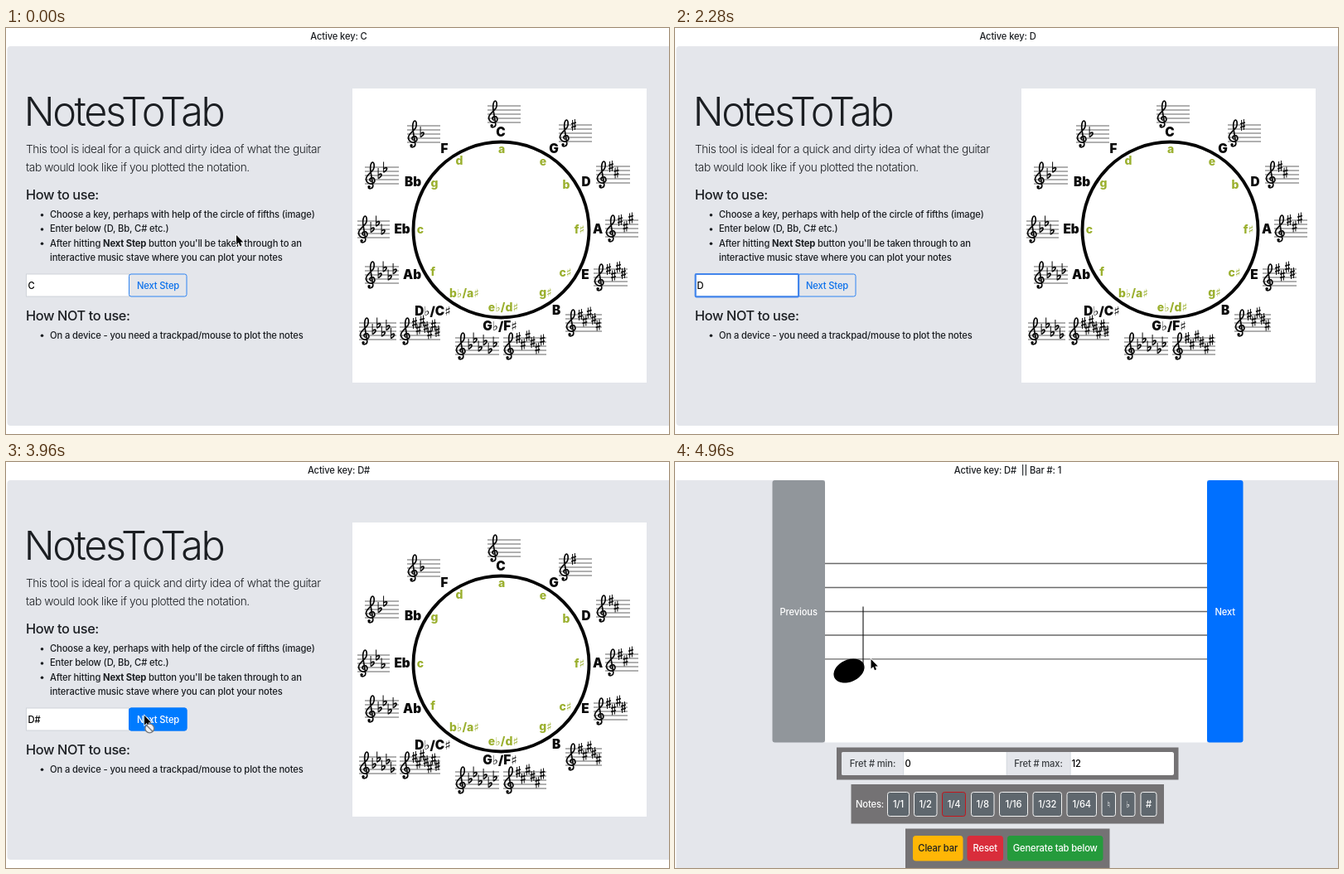
An HTML page that plays this animation: 800 px wide and 490 px high, repeating every 5000 ms.

```html
<!DOCTYPE html>
<html lang="en">
<head>
<meta charset="utf-8">
<title>NotesToTab</title>
<style>
  html, body { margin: 0; width: 100%; height: 100%; overflow: hidden; background: #fff; }
  svg { display: block; width: 800px; height: 490px; }
  text {
    font: 450 11.2px Inter, "DejaVu Sans", sans-serif;
    font-optical-sizing: none;
    letter-spacing: -.012em;
    fill: #1b1e22;
    white-space: pre;
  }
  .mid { text-anchor: middle; }
  .title { font-size: 48.5px; font-weight: 340; letter-spacing: -.049em; }
  .lead { font-size: 13.7px; font-weight: 350; letter-spacing: -.027em; }
  .head { font-size: 16.3px; font-weight: 550; letter-spacing: -.024em; }
  .bold { font-weight: 700; }
  .field { fill: #000; }
  .white { fill: #fff; }
  .key { font-size: 15.3px; font-weight: 900; letter-spacing: 0; fill: #0b0b0b; }
  .minor { font-size: 14px; font-weight: 800; letter-spacing: 0; fill: #9bb02f; }
  .note { font-weight: 550; }
</style>
</head>
<body>
<svg viewBox="0 0 800 490">
  <rect width="800" height="490" fill="#fff"/>
  <text id="header" class="mid" x="401.5" y="14.2"></text>

  <g id="intro">
    <rect x="1.5" y="22" width="806" height="458" rx="4" fill="#e4e6eb"/>
    <text class="title" x="21.8" y="118">NotesToTab</text>
    <text class="lead" x="24" y="151">This tool is ideal for a quick and dirty idea of what the guitar</text>
    <text class="lead" x="24" y="172.7">tab would look like if you plotted the notation.</text>
    <text class="head" x="24" y="207">How to use:</text>
    <text x="53" y="229">Choose a key, perhaps with help of the circle of fifths (image)</text>
    <text x="53" y="246.3">Enter below (D, Bb, C# etc.)</text>
    <text x="53" y="263.6">After hitting <tspan class="bold">Next Step</tspan> button you'll be taken through to an</text>
    <text x="53" y="281">interactive music stave where you can plot your notes</text>
    <text class="head" x="24" y="352.7">How NOT to use:</text>
    <text x="53" y="374.7">On a device - you need a trackpad/mouse to plot the notes</text>
    <g fill="#1b1e22">
      <circle cx="43.5" cy="225.7" r="1.8"/><circle cx="43.5" cy="243" r="1.8"/>
      <circle cx="43.5" cy="260.2" r="1.8"/><circle cx="43.5" cy="371.3" r="1.8"/>
    </g>

    <rect x="24.5" y="297" width="124" height="27" fill="#fff" stroke="#d0d4da"/>
    <rect x="148.5" y="297" width="69.5" height="27" rx="2.5" fill="none" stroke="#2f84f2"/>
    <rect id="hover" x="148.5" y="297" width="69.5" height="27" rx="2.5" fill="#007bff" stroke="#007bff"/>
    <text id="next" class="mid" x="183.5" y="315">Next Step</text>
    <rect id="ring" x="24.7" y="297" width="124.4" height="27.3" rx="1" fill="none" stroke="#4285ec" stroke-width="2.2"/>
    <text id="value" x="26.5" y="315"></text>

    <rect x="418" y="73" width="355" height="355" fill="#fff"/>
    <circle cx="597.5" cy="243.5" r="106" fill="none" stroke="#050505" stroke-width="3.9"/>
    <g id="fifths"></g>
  </g>

  <g id="editor">
    <rect x="1.5" y="22" width="800" height="468" fill="#e4e6eb"/>
    <rect x="181" y="22" width="461" height="316.5" fill="#fff"/>
    <path d="M181 122.5h461M181 151.5h461M181 180.5h461M181 209h461M181 237.8h461" stroke="#6a6a6a" stroke-width="1.3"/>
    <rect x="117.5" y="22" width="63.5" height="316.5" rx="3" fill="#91969b"/>
    <rect x="642" y="22" width="43.5" height="316.5" rx="3" fill="#0070ff"/>
    <text class="mid white" x="149.2" y="184.5">Previous</text>
    <text class="mid white" x="663.7" y="184.5">Next</text>

    <g fill="#747274">
      <rect x="195" y="344.5" width="412.5" height="39"/>
      <rect x="212.5" y="389" width="377.5" height="47.5"/>
      <rect x="278" y="442.5" width="246.5" height="48"/>
    </g>
    <rect x="201" y="350" width="401" height="28" rx="2.5" fill="#fff"/>
    <path d="M203 350H276V378H203Q201 378 201 376V352Q201 350 203 350ZM400 350H477V378H400Z" fill="#e4e6eb"/>
    <path d="M275.7 350V378M400.2 350V378M477.2 350V378" stroke="#cfd4da" stroke-width=".8"/>
    <text class="mid" x="238.5" y="368.2" fill-opacity=".85">Fret # min:</text>
    <text class="mid" x="438.5" y="368.2" fill-opacity=".85">Fret # max:</text>
    <text class="field" x="277.5" y="368.2">0</text>
    <text class="field" x="478.5" y="368.2">12</text>
    <text class="white note" x="218" y="417">Notes:</text>
    <g id="buttons"></g>
    <g id="placed">
      <ellipse cx="210" cy="252" rx="19.5" ry="13.3" transform="rotate(-25 210 252)"/>
      <path d="M227 174.5V249" stroke="#111" stroke-width="1.1"/>
    </g>
  </g>

  <g id="cursor">
    <path id="arrow" d="M0 0V11.6L2.7 9.1L4.5 13.2L6.5 12.3L4.8 8.4H8.3Z" stroke="#fff" stroke-width="1.4" paint-order="stroke"/>
    <g id="banned" fill="none" stroke="#77797c" stroke-width="1.4">
      <circle cx="6.3" cy="15.5" r="5.4" fill="#eceef0"/>
      <path d="M2.6 11.8L10 19.2"/>
    </g>
    <path id="beam" d="M-2.5-5.5Q0-5.5 0-3.5Q0-5.5 2.5-5.5M0-4V4M-2.5 5.5Q0 5.5 0 3.5Q0 5.5 2.5 5.5M-1.3 2.5H1.3" fill="none" stroke="#222" stroke-width="1.1"/>
    <path id="hand" d="M-1 0Q0-1 1 0V5L6 6Q8 6.5 7.5 9L6.5 13H-.5L-4 8Q-4 6-1 8Z" fill="#fff" stroke="#111"/>
  </g>
</svg>

<script>
const LOOP = 5000, SWITCH = 4000;
const $ = id => document.getElementById(id);

function add(parent, tag, attrs, content = '') {
  const el = document.createElementNS('http://www.w3.org/2000/svg', tag);
  for (const name in attrs) el.setAttribute(name, attrs[name]);
  el.textContent = content;
  parent.append(el);
  return el;
}

// Circle of fifths: label and centre
const majors = 'C 597 126|G 661 146|D 700 186|A 714 243|E 699 298|B 664 341|G♭/F♯ 596 360|D♭/C♯ 515 342|Ab 490 298|Eb 478 243|Bb 491 186|F 529 146';
const minors = 'a 598 147|e 648 162|b 676 190|f♯ 692 244|c♯ 675 296|g♯ 651 320|e♭/d♯ 600 338|b♭/a♯ 553 321|f 515 295|c 500 244|g 517 188|d 547 161';
// Staves: left, middle line, width, accidentals (flats below zero)
const staves = [
  [581, 104, 40, 0], [667, 127, 40, 1], [712, 177, 41, 2], [723, 242, 40, 3],
  [709, 301, 41, 4], [675, 356, 44, 5], [600, 384, 52, 6], [475, 366, 49, 7],
  [484, 128, 40, -1], [433, 178, 41, -2], [424, 243, 39, -3], [433, 298, 41, -4],
  [426, 366, 45, -5], [542, 384, 53, -6]
];
const CLEF = 'M.5 7.5C-2 7-2.5 3.5 .5 2.8C4 2.2 5.5 6 3.5 8.5C1 11.5-5.5 10-6 4.5C-6.2 0 0-3 2.8-7.5C4.6-11 3.6-16 1.8-16C-.8-15.5-1.2-9-.5-5L2.3 12C2.6 15.5-2 17-3.5 14.5';
// Each accidental: steps from the middle line, thin strokes, thick strokes
const SHARP = { steps: [4, 1, 5, 2, -1, 3, 0], thin: 'M-1.4-6V7M1.4-7V6', thick: 'M-2.9-1.2L2.9-3M-2.9 3L2.9 1.2' };
const FLAT = { steps: [0, 3, -1, 2, -2, 1], thin: 'M-1.9-9V4', thick: 'M-1.7 3.6C4 0 2.6-3.8-1.7-.6' };

function labels(list, cls, drop) {
  for (const item of list.split('|')) {
    const [name, x, y] = item.split(' ');
    add($('fifths'), 'text', { class: 'mid ' + cls, x, y: +y + drop }, name);
  }
}

function stroke(parent, d, width, color = '#0a0a0a') {
  add(parent, 'path', { d, fill: 'none', stroke: color, 'stroke-width': width });
}

function stave([x, y, width, count]) {
  const g = add($('fifths'), 'g', { transform: `translate(${x} ${y})` });
  for (let i = -2; i <= 2; i++) stroke(g, `M0 ${i * 5}H${width}`, .8, '#3a3a3a');
  const clef = add(g, 'g', { transform: 'translate(7.5 0)' });
  stroke(clef, CLEF, 1.7);
  add(clef, 'circle', { cx: -2.4, cy: 13.6, r: 1.7 });
  const n = Math.abs(count), gap = Math.min(6.5, (width - 17) / n);
  const sign = count > 0 ? SHARP : FLAT;
  for (let i = 0; i < n; i++) {
    const mark = add(g, 'g', { transform: `translate(${18 + i * gap} ${-2.5 * sign.steps[i]})` });
    stroke(mark, sign.thin, 1);
    stroke(mark, sign.thick, 1.7);
  }
}

labels(majors, 'key', 5.3);
labels(minors, 'minor', 4);
staves.forEach(stave);

function button(x, right, y, height, label, fill, stroke, cls) {
  add($('buttons'), 'rect', { x: x + .5, y, width: right - x - 1, height, rx: 2.8, fill, stroke });
  add($('buttons'), 'text', { class: 'mid ' + cls, x: (x + right) / 2, y: y + height / 2 + 4 }, label);
}

[['1/1', 256, 283], ['1/2', 288, 316.5], ['1/4', 322, 351], ['1/8', 357, 385.5],
 ['1/16', 391, 426], ['1/32', 431.5, 467], ['1/64', 472.5, 509], ['♮', 514.5, 532],
 ['♭', 537.5, 555.5], ['#', 561.5, 581.5]]
  .forEach(([label, x, right]) =>
    button(x, right, 398.5, 29, label, '#5f676e', label === '1/4' ? '#c4161c' : '#f2f2f2', 'white note'));
button(287, 347.5, 451.5, 29.5, 'Clear bar', '#ffb606', '#ffb606', '');
button(352.5, 396, 451.5, 29.5, 'Reset', '#d92d3b', '#d92d3b', 'white');
button(401, 516.5, 451.5, 29.5, 'Generate tab below', '#259b3c', '#259b3c', 'white');

// Pointer moves: start, end, from, to
const moves = [
  [40, 600, [278, 250], [93, 322]],
  [3400, 3680, [93, 322], [167, 306]],
  [4440, 4860, [167, 306], [236.5, 238]]
];
const typed = [[0, 'C'], [1280, ''], [2000, 'D'], [2600, 'D#']];

const ramp = (t, a, b) => Math.min(1, Math.max(0, (t - a) / (b - a)));
const ease = u => u * u * (3 - 2 * u);
const show = (id, on) => { $(id).style.display = on ? '' : 'none'; };

function pointer(t) {
  const [a, b, from, to] = moves.filter(m => t >= m[0]).pop() || moves[0];
  const u = ease(ramp(t, a, b));
  return from.map((v, i) => v + (to[i] - v) * u);
}

function draw(t) {
  const editing = t >= SWITCH;
  const key = typed.filter(s => t >= s[0]).pop()[1];
  show('intro', !editing);
  show('editor', editing);
  show('placed', t >= 4880);
  $('header').textContent = editing ? `Active key: ${key}\u00a0 || Bar #: 1` : `Active key: ${key}`.trim();

  show('ring', t >= 840 && t < 3760);
  $('value').textContent = key || 'C by default';
  $('value').style.fill = key ? '#000' : '#6c6c6c';
  const hover = ramp(t, 3585, 3735);
  $('hover').style.opacity = hover;
  $('next').style.fill = `rgb(${[10, 112, 235].map(c => c + (255 - c) * hover)})`;

  const [x, y] = pointer(t);
  $('cursor').setAttribute('transform', `translate(${x} ${y})`);
  show('cursor', t < 1280 || t >= 3400);
  const beam = !editing && x < 149 && y > 296;
  const hand = t >= 3585 && t < 3920;
  show('beam', beam);
  show('hand', hand && !beam);
  show('arrow', !beam && !hand);
  show('banned', t >= 3920 && x < 181);
}

const start = performance.now();
function tick() {
  draw((performance.now() - start) % LOOP);
  requestAnimationFrame(tick);
}
tick();
</script>
</body>
</html>
```
